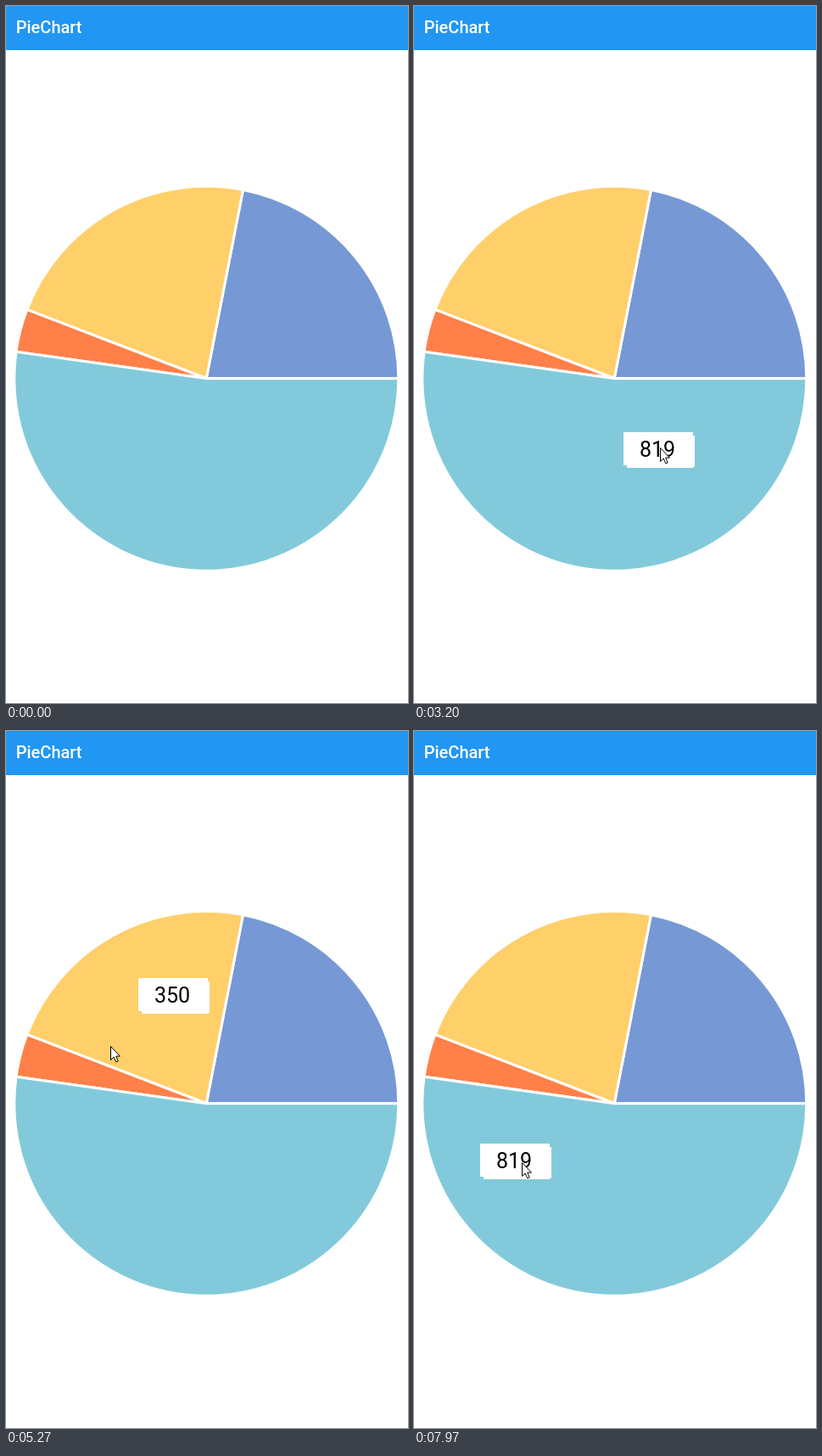
Write an HTML page that moves like this. It is 474 by 821 pixels and loops after 7.99 s.

```html
<!DOCTYPE html>
<html lang="en">
<head>
<meta charset="utf-8">
<title>PieChart</title>
<style>
  html, body { margin: 0; width: 100%; height: 100%; overflow: hidden; background: #fff; }
  svg { display: block; width: 100%; height: 100%; }
  text { font-family: Roboto, sans-serif; }
  .title { font-size: 20px; font-weight: 500; fill: #fff; }
  .value { font-size: 25px; text-anchor: middle; }
  #pie path { stroke: #fff; stroke-width: 3; stroke-linejoin: round; }
</style>
</head>
<body>
<svg viewBox="0 0 474 821">
  <rect width="474" height="52" fill="#2196f3"/>
  <text class="title" x="11.7" y="32">PieChart</text>
  <g id="pie"></g>
  <g id="tip" visibility="hidden">
    <path d="M0 0h82v4h2v37h-2v1H4v-3H0z" fill="#fff"/>
    <text class="value" x="40" y="28.5"></text>
  </g>
  <path id="cursor" visibility="hidden" fill="#fff" stroke="#000"
    d="M.5 .5V16.5L4.2 13L6.8 18.9L9.2 17.9L6.7 12.1H11.4Z"/>
</svg>
<script>
const LOOP = 7990;
const ENTER = 200;
const SAG = 11;
const center = { x: 236.25, y: 438.75 };
const radius = 226.5;

const pie = document.getElementById('pie');
const tip = document.getElementById('tip');
const tipText = tip.querySelector('text');
const cursor = document.getElementById('cursor');

// Slice angles are whole degrees, counterclockwise from the right.
const slices = [
  { value: 342, color: '#7699d5' },
  { value: 350, color: '#ffcf6a' },
  { value: 55, color: '#ff8048' },
  { value: 819, color: '#82cadb' }
];
const total = slices.reduce((sum, slice) => sum + slice.value, 0);
let edge = 0;
for (const slice of slices) {
  slice.from = edge;
  slice.to = edge += Math.round(slice.value / total * 360);
}

// The pointer leaves its last stop, glides to x, y and taps there.
const stop = (leave, arrive, tap, x, y) => ({ leave, arrive, tap, x, y });
const stops = [
  stop(0, 0, 0, 387, 822),
  stop(170, 820, 820, 293, 670),
  stop(1150, 1480, 1760, 148, 535),
  stop(1890, 2620, 2680, 289, 523),
  stop(3170, 3730, 3790, 341, 361),
  stop(4280, 4710, 4770, 198, 312),
  stop(4890, 5880, 6010, 64, 398),
  stop(6280, 6880, 6900, 213, 348),
  stop(7030, 7320, 7380, 227, 482),
  stop(7500, 8180, 7970, 120, 507)
];

function rimPoint(degrees) {
  const a = degrees * Math.PI / 180;
  return `${center.x + radius * Math.cos(a)} ${center.y - radius * Math.sin(a)}`;
}

function drawPie() {
  pie.innerHTML = slices.map(({ from, to, color }) =>
    `<path fill="${color}" d="M${center.x} ${center.y}L${rimPoint(from)}` +
    `A${radius} ${radius} 0 ${+(to - from > 180)} 0 ${rimPoint(to)}Z"/>`).join('');
}

function sliceAt({ x, y }) {
  const dx = x - center.x, dy = center.y - y;
  if (Math.hypot(dx, dy) > radius) return undefined;
  const degrees = (Math.atan2(dy, dx) * 180 / Math.PI + 360) % 360;
  return slices.find(slice => degrees < slice.to);
}

// Smoothstep with a quick start and a long settle.
function ease(s) {
  const p = 1 - (1 - s) ** 1.6;
  return p * p * (3 - 2 * p);
}

function cursorAt(t) {
  const i = Math.max(1, stops.findLastIndex(({ leave }) => leave <= t));
  const a = stops[i - 1], b = stops[i];
  const p = ease(Math.min(1, Math.max(0, (t - b.leave) / (b.arrive - b.leave))));
  return {
    x: Math.round(a.x + (b.x - a.x) * p),
    y: Math.round(a.y + (b.y - a.y) * p + SAG * Math.sin(Math.PI * p))
  };
}

function place(node, visible, x, y) {
  node.setAttribute('visibility', visible ? 'visible' : 'hidden');
  node.setAttribute('transform', `translate(${x} ${y})`);
}

function render(t) {
  const pointer = cursorAt(t);
  place(cursor, t >= ENTER, pointer.x, pointer.y);

  const tapped = stops.findLast(({ tap }) => tap <= t);
  const slice = sliceAt(tapped);
  tipText.textContent = slice ? slice.value : '';
  place(tip, slice, tapped.x - 42, tapped.y - 21);
}

function loop() {
  render((performance.now() - begin) % LOOP);
  requestAnimationFrame(loop);
}

drawPie();
const begin = performance.now();
loop();
</script>
</body>
</html>
```
